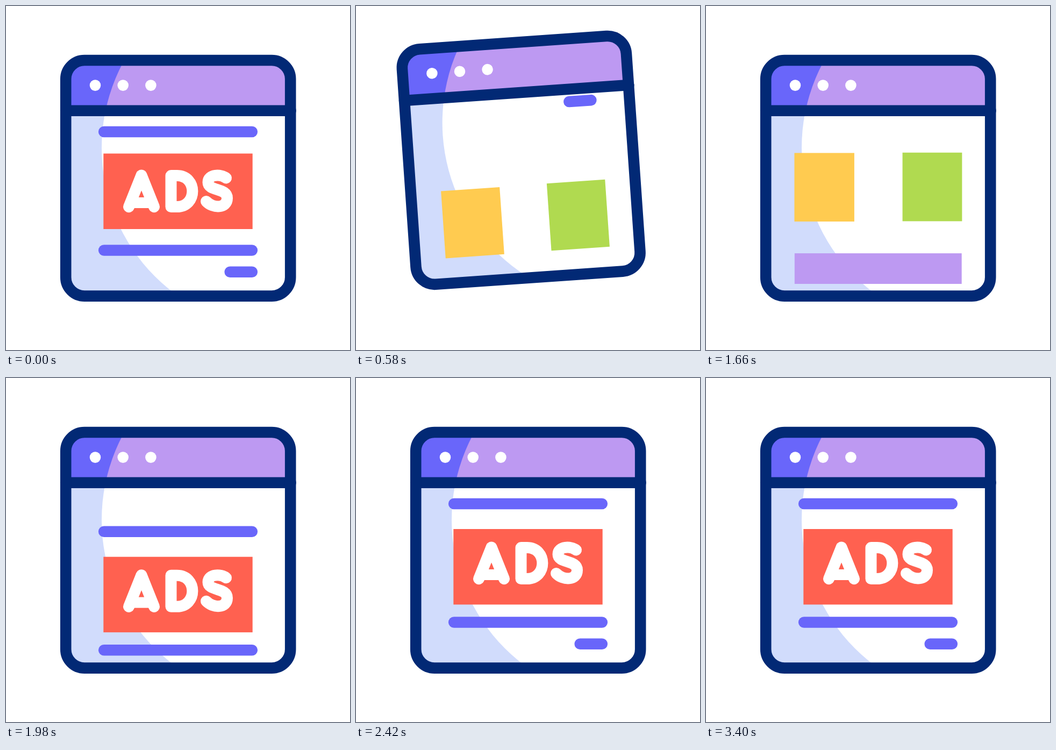
An HTML page with a canvas for the animation above (3600 ms loop, 640x640 px).

```html
<!DOCTYPE html>
<html lang="en">
<head>
<meta charset="utf-8">
<title>Ads window</title>
<style>
  html, body { margin: 0; width: 100%; height: 100%; overflow: hidden; background: #fff; }
  canvas { display: block; width: 640px; height: 640px; }
</style>
</head>
<body>
<canvas id="stage" width="640" height="640"></canvas>
<script>
const ctx = document.getElementById('stage').getContext('2d');
const LOOP = 3600;
const SCROLL = 397;
const COLOR = {
  navy: '#022975', violet: '#6966fa', lilac: '#bd99f2', pale: '#d1dcfc',
  red: '#ff6150', yellow: '#ffcb50', green: '#b0da50', white: '#fff'
};

const letters = [
  // A: legs, then the filled crossbar
  new Path2D('M228.5 373.7L252 315L275.5 373.7'),
  // D
  new Path2D('M307 315.6H318C356.5 315.6 356.5 373.6 318 373.6H307Z'),
  // S
  new Path2D('M409.5 320C400 312.5 376 312.5 376 328C376 345 411.5 338 411.5 357.5C411.5 377 385 377 372.5 363.5')
];

const span = (t, from, to) => Math.min(1, Math.max(0, (t - from) / (to - from)));
const smooth = u => u * u * (3 - 2 * u);
const steep = u => u < 0.5 ? 16 * u ** 5 : 1 - 16 * (1 - u) ** 5;
const ramp = (t, from, to) => smooth(span(t, from, to));
const pulse = (t, from, mid, to) => ramp(t, from, mid) - ramp(t, mid, to);

function rect(color, left, top, right, bottom) {
  ctx.fillStyle = color;
  ctx.fillRect(left, top, right - left, bottom - top);
}

function line(color, x1, x2, y) {
  ctx.strokeStyle = color;
  ctx.lineWidth = 20.6;
  ctx.beginPath();
  ctx.moveTo(x1, y);
  ctx.lineTo(x2, y);
  ctx.stroke();
}

function disc(color, x, y, r) {
  ctx.fillStyle = color;
  ctx.beginPath();
  ctx.arc(x, y, r, 0, Math.PI * 2);
  ctx.fill();
}

function framePath() {
  ctx.beginPath();
  ctx.roundRect(111.2, 101, 418, 438.6, 34.8);
}

function clipped(top, bottom, draw) {
  ctx.save();
  ctx.beginPath();
  ctx.rect(111, top, 418, bottom - top);
  ctx.clip();
  draw();
  ctx.restore();
}

function scaledAbout(x, y, scale, draw) {
  ctx.save();
  ctx.translate(x, y);
  ctx.scale(scale, scale);
  ctx.translate(-x, -y);
  draw();
  ctx.restore();
}

function drawAd(bannerTop) {
  line(COLOR.violet, 182.2, 457.8, 234);
  rect(COLOR.red, 181.3, bannerTop, 458.7, bannerTop + 140.5);
  ctx.strokeStyle = COLOR.white;
  ctx.lineWidth = 21;
  letters.forEach(path => ctx.stroke(path));
  rect(COLOR.white, 236, 356, 268, 376);
  line(COLOR.violet, 182.2, 457.8, 454.5);
  line(COLOR.violet, 416.7, 457.8, 494.8);
}

function drawBlocks(scale) {
  scaledAbout(320.5, 310, scale, () => {
    rect(COLOR.yellow, 159.5, 244.2, 274.5, 375.8);
    rect(COLOR.green, 367, 243.5, 481.3, 375.2);
  });
  scaledAbout(320.3, 461.4, scale, () => rect(COLOR.lilac, 159.9, 432, 480.6, 490.7));
}

function scrollAt(t) {
  if (t < 1400) return -SCROLL * ramp(t, 200, 800);
  if (t < 2200) return -SCROLL + (SCROLL + 63) * steep(span(t, 1400, 2200));
  return 63 * (1 - ramp(t, 2200, 2420));
}

function draw(t) {
  const tilt = pulse(t, 200, 600, 1000);
  const hop = pulse(t, 3000, 3200, 3400);
  const scroll = scrollAt(t);
  const blockScale = 0.906 + 0.094 * (span(t, 200, 1000) - span(t, 1400, 2200));

  rect(COLOR.white, 0, 0, 640, 640);
  ctx.save();
  ctx.translate(320 - 13.1 * tilt, 320 - 33.6 * tilt - 22 * hop);
  ctx.rotate(-4 * tilt * Math.PI / 180);
  ctx.translate(-320, -320);
  ctx.lineCap = ctx.lineJoin = 'round';

  ctx.save();
  framePath();
  ctx.clip();
  clipped(101, 195, () => {
    rect(COLOR.violet, 101, 91, 540, 195);
    disc(COLOR.lilac, 516, 264, 338);
  });
  clipped(194, 540, () => {
    rect(COLOR.pale, 101, 194, 540, 550);
    disc(COLOR.white, 516, 264, 338);
    ctx.translate(0, scroll);
    drawAd(t < 1200 ? 274.5 : 281);
    ctx.translate(0, SCROLL);
    drawBlocks(blockScale);
  });
  ctx.restore();

  line(COLOR.navy, 111.2, 529.6, 194.7);
  ctx.strokeStyle = COLOR.navy;
  framePath();
  ctx.stroke();
  [166, 217.7, 269.4].forEach(x => disc(COLOR.white, x, 147.6, 10.3));
  ctx.restore();
}

const start = performance.now();
function tick() {
  draw((performance.now() - start) % LOOP);
  requestAnimationFrame(tick);
}
tick();
</script>
</body>
</html>
```
